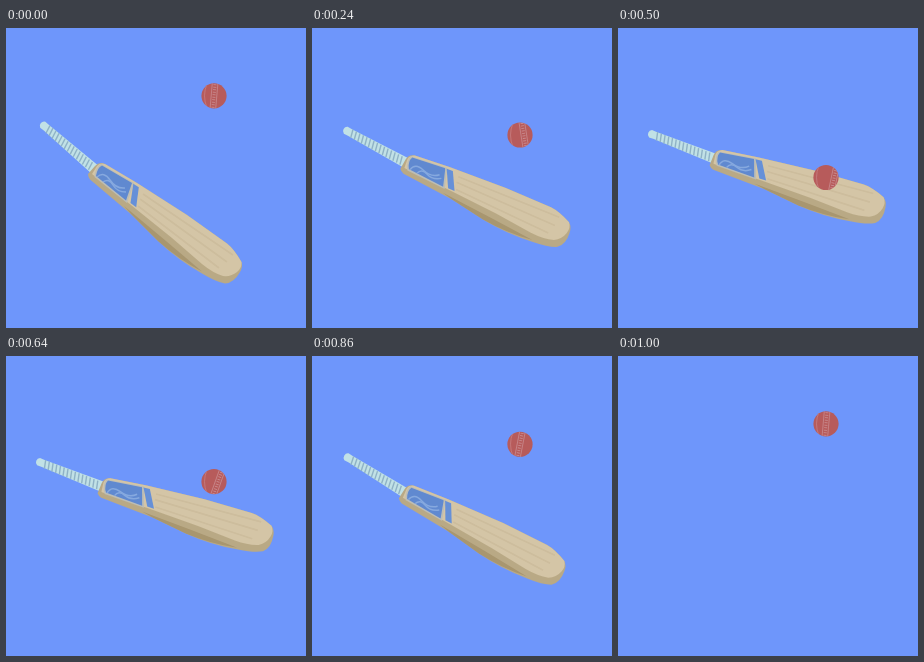
An HTML page for the animation above (1020 ms loop, 300 by 300 pixels).

```html
<!DOCTYPE html>
<html lang="en">
<head>
<meta charset="utf-8">
<title>Cricket bat and ball</title>
<style>
  html, body { margin: 0; width: 100%; height: 100%; overflow: hidden; background: #6e96fb; }
  svg { display: block; width: 100vw; height: 100vh; }
</style>
</head>
<body>
<svg viewBox="0 0 300 300">
  <defs>
    <clipPath id="ballClip"><circle r="12.6"/></clipPath>
    <clipPath id="stickerClip"><path d="M96 137.500 L126 155 L120 172.500 L90 148 Q91 140 96 137.500 Z"/></clipPath>
    <clipPath id="faceClip"><path d="M86 146 L91 138 Q94 134.500 99 136 L131 155 L181 187 L221 215.500 Q228 221 235.500 234 Q236 240 231 244 Q225 249 217 248 Q207 245 196 236 L166 210 L130 181 Z"/></clipPath>
  </defs>

  <g id="bat">
    <g transform="translate(38.300 98) rotate(40.700)">
      <path d="M-2 -4 Q-4.500 -3 -4.500 0 Q-4.500 3 -2 4 L3 3.800 L67 5.200 L67 -5.200 L3 -3.800 Z" fill="#c1e1e6"/>
      <g id="grip" stroke="#8fb2c6" stroke-width="1.400"/>
    </g>
    <path d="M82 146 L89 138 Q93 133.500 99 136 L131 155 L181 187 L221 215.500 Q228 221 235.500 234 Q237 239 234 244 Q228 255 219 255.500 Q210 254 196 245.500 Q172 232 152 213 L126 187 L84 151.500 Q82 149 82 146 Z" fill="#b9a985"/>
    <path d="M118 178 L160 213 L196 243.500 Q172 231 152 213 L126 187 Z" fill="#a8966f"/>
    <g clip-path="url(#faceClip)">
      <rect x="80" y="130" width="160" height="122" fill="#d4c5a6"/>
      <g fill="none" stroke="#cdbd9d" stroke-width="1.700">
        <path d="M137 166 L227 227"/>
        <path d="M134 171 L221 234"/>
        <path d="M132 178 L213 240"/>
      </g>
    </g>
    <path d="M95 136 L128 155 L121 175 L88.500 149 Q89 140 95 136 Z" fill="#bcbdb6"/>
    <g clip-path="url(#stickerClip)">
      <rect x="86" y="134" width="44" height="42" fill="#6089d0"/>
      <g fill="none" stroke="#86a9df" stroke-width="1.500">
        <path d="M91 149 Q98 143 104 152 T119 160"/>
        <path d="M97 154 Q103 150 107 157 T120 164"/>
      </g>
    </g>
    <path d="M127.300 155.700 L132.800 159.200 L130.200 179.200 L124.500 175 Z" fill="#6690d8"/>
  </g>

  <g id="ball">
    <circle r="12.600" fill="#b75b5b"/>
    <g clip-path="url(#ballClip)" fill="none">
      <path d="M-7 -12 Q-12 0 -7 12" stroke="#c77f82" stroke-width=".8"/>
      <g id="seam" stroke="#cb9094">
        <path d="M-2.800 -14 V14 M2.800 -14 V14" stroke-width=".7"/>
        <path d="M0 -14 V14" stroke-width="3" stroke-dasharray=".8 1.700"/>
      </g>
    </g>
  </g>
</svg>
<script>
const LOOP = 1020, STEP = 20;
const PIVOT = "61 113.5";
const bat = document.getElementById("bat");
const ball = document.getElementById("ball");
const seam = document.getElementById("seam");

document.getElementById("grip").innerHTML = Array.from({ length: 15 }, (_, i) => {
  const x = 5 + i * 4;
  return `<path d="M${x - 1} -4 L${x + 1} 4.4"/>`;
}).join("");

// Keys: [time, lift in degrees, degrees per ms]
const swing = [
  [0, 0, 0.03], [160, 7.2, 0.055], [340, 17.3, 0.028],
  [520, 19.4, 0], [740, 17.3, -0.036], [860, 9.1, -0.073], [980, 0, -0.07]
];
// Keys: [time, tilt, sideways offset]
const spin = [
  [0, 5, 0], [160, -8, 2], [340, -10, 6], [500, 12, 8],
  [740, 25, 1], [860, 11, 0], [980, 5, 0]
];

function segment(keys, t) {
  const i = Math.max(1, keys.findIndex(k => k[0] >= t));
  const a = keys[i - 1], b = keys[i];
  return { a, b, span: b[0] - a[0], u: (t - a[0]) / (b[0] - a[0]) };
}

function lift(t) {
  const { a, b, span, u } = segment(swing, t);
  const v = 1 - u;
  return a[1] * v * v * (1 + 2 * u) + b[1] * u * u * (3 - 2 * u)
    + span * u * v * (a[2] * v - b[2] * u);
}

function draw(time) {
  const now = Math.floor((time % LOOP) / STEP) * STEP;
  const t = Math.min(now, 980);

  bat.setAttribute("visibility", now >= 1000 ? "hidden" : "visible");
  bat.setAttribute("transform", `rotate(${-lift(t)} ${PIVOT})`);

  const drop = t < 500 ? t / 500 : (980 - t) / 480;
  ball.setAttribute("transform", `translate(208 ${67.8 + 81.7 * drop})`);

  const { a, b, u } = segment(spin, t);
  const mix = k => a[k] + (b[k] - a[k]) * u;
  seam.setAttribute("transform", `rotate(${mix(1)}) translate(${mix(2)} 0)`);
}

const start = performance.now();
function tick() {
  draw(performance.now() - start);
  requestAnimationFrame(tick);
}
tick();
</script>
</body>
</html>
```
